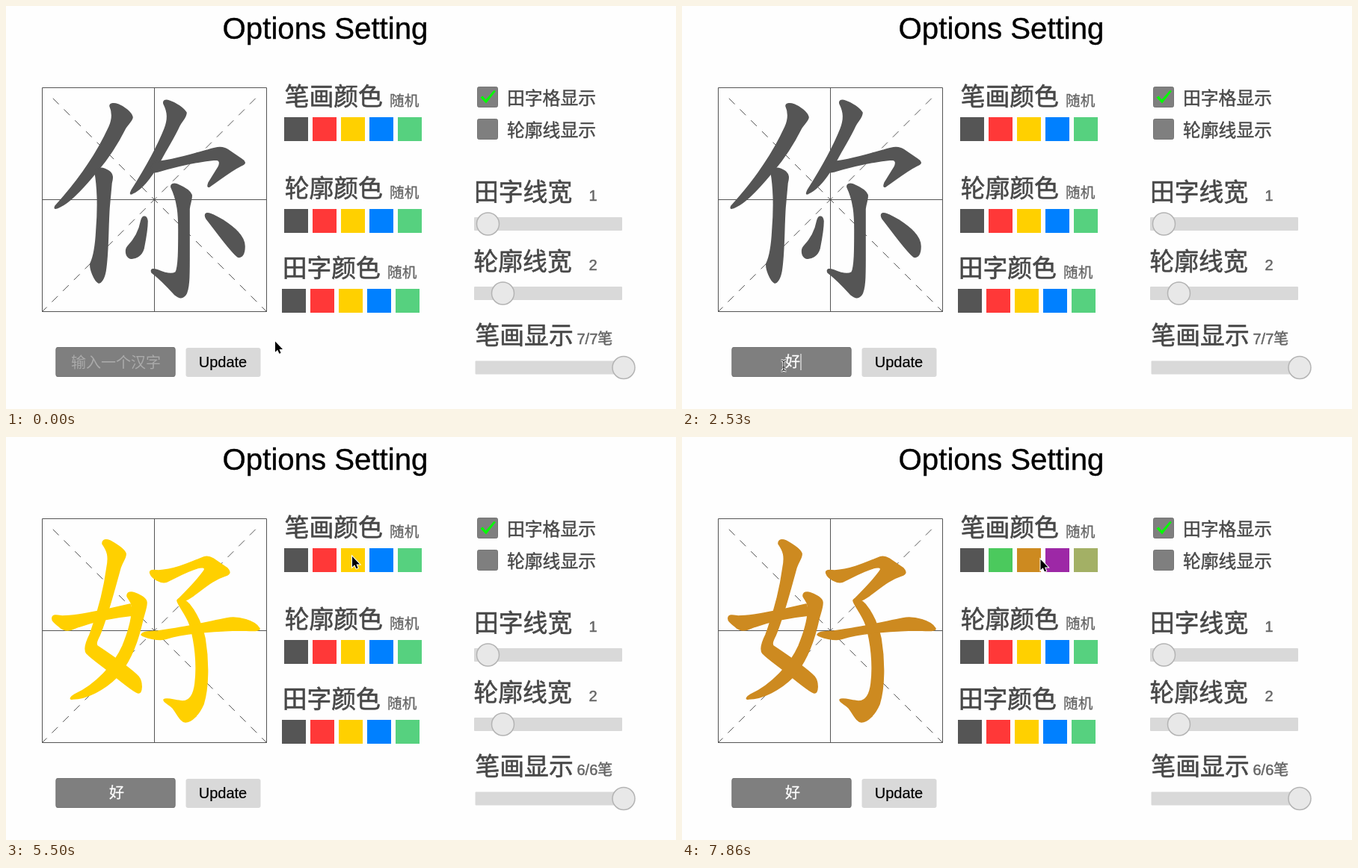
An HTML page for the animation above (8 s loop, 896 px wide and 540 px high).

```html
<!DOCTYPE html>
<html lang="zh">
<head>
<meta charset="utf-8">
<title>Options Setting</title>
<style>
html, body { margin: 0; width: 100%; height: 100%; overflow: hidden; background: #fefefe; }
svg { display: block; width: 896px; height: 540px; }
text { font-family: "Liberation Sans", "Noto Sans CJK SC", "Noto Sans CJK", sans-serif; white-space: pre; }
.cjk { font-family: "Noto Sans CJK SC", "Noto Sans CJK", sans-serif; }
</style>
</head>
<body>
<svg id="stage" viewBox="0 0 896 540">
  <defs>
    <filter id="shade" x="-10%" y="-60%" width="120%" height="240%">
      <feDropShadow dx="0" dy="3" stdDeviation="5" flood-opacity=".3"/>
    </filter>
  </defs>
</svg>
<script>
const stage = document.getElementById('stage');
const GREY = '#555555', RED = '#ff3838', YELLOW = '#ffd000', BLUE = '#0080ff', GREEN = '#56d17f';
const BASE = [GREY, RED, YELLOW, BLUE, GREEN];
const RANDOM = [GREY, '#4bc95d', '#cd8a20', '#9d28a6', '#a3b065'];
const LOOP = 8000;

function add(tag, attrs, parent = stage) {
  const el = document.createElementNS('http://www.w3.org/2000/svg', tag);
  for (const k in attrs) el.setAttribute(k, attrs[k]);
  parent.appendChild(el);
  return el;
}
const group = (parent, attrs = {}) => add('g', attrs, parent);
const rect = (x, y, width, height, fill, rx = 0, parent) =>
  add('rect', { x, y, width, height, fill, rx }, parent);
function text(str, x, y, size, fill, opts = {}, parent) {
  const el = add('text', { x, y, 'font-size': size, fill, ...opts }, parent);
  el.textContent = str;
  return el;
}
const MID = { 'text-anchor': 'middle' };
const heavier = (stroke, width) => ({ stroke, 'stroke-width': width });
const show = (el, on) => el.setAttribute('display', on ? 'inline' : 'none');

// Writing grid
const grid = group(stage, { fill: 'none', stroke: GREY, 'stroke-width': 1 });
add('path', { d: 'M48.5 109.5H348.5V409.5H48.5ZM198.5 109.5V409.5M48.5 259.5H348.5' }, grid);
for (const d of ['M62.8 123.8L348.5 409.5', 'M333.7 123.8L48.5 409.5'])
  add('path', { d, 'stroke-dasharray': '11 9.8' }, grid);

// Brush strokes of the two characters
const GLYPHS = {
  你: [
    'M139 134C139 130 145 130 150 132C158 135 168 143 169 149C169 153 164 157 160 163C150 183 136 205 122 221C104 243 84 264 72 269C66 272 64 272 66 268C85 247 97 232 110 212C122 194 132 175 138 162C143 151 143 143 139 134Z',
    'M119 222C124 215 131 217 137 221C143 225 143 230 141 237L138 270C136 300 137 330 133 355C131 366 127 371 124 371C118 368 112 352 113 345C118 335 120 320 121 300C123 275 123 245 119 222Z',
    'M211 131C210 127 213 125 218 127C228 130 238 138 241 143C241 149 236 153 232 160C224 178 214 192 205 210C196 226 183 245 169 251C166 253 166 251 168 247C180 228 200 195 212 165C217 152 217 143 211 131Z',
    'M198 209C225 207 250 198 270 193C283 189 290 188 297 193L316 206C321 209 320 212 314 214C298 222 283 235 272 242C269 243 270 240 271 237L284 216C287 210 286 206 280 206C258 208 230 214 203 222C195 224 190 222 198 209Z',
    'M221 243C220 238 226 237 231 240C238 243 246 248 248 253C249 258 246 263 245 272L245 340C245 360 245 380 240 387C235 393 231 391 226 387C218 378 207 366 195 357C193 352 197 352 203 354C212 358 222 360 227 357C231 350 231 325 231 300C231 280 230 262 221 243Z',
    'M181 287C183 280 188 281 189 288C189 300 186 315 184 325C181 335 173 339 166 338C160 335 159 327 163 322C171 314 178 303 181 287Z',
    'M268 278C271 276 280 281 290 287C305 297 319 308 319 322C319 333 315 338 310 336C301 330 280 300 268 285C266 281 266 279 268 278Z'
  ],
  好: [
    'M129 143C129 137 134 137 139 139C148 144 158 150 160 156C161 161 156 166 153 175C146 200 136 240 125 266C121 274 120 277 122 280C140 292 165 309 177 321C183 329 182 343 177 343C172 342 160 332 145 320C130 307 118 300 108 290C104 285 107 275 112 265C122 238 131 205 135 175C138 160 136 153 129 143Z',
    'M162 213C162 208 167 207 172 209C180 212 188 217 188 222C188 230 184 238 182 248C176 275 165 303 148 322C132 338 108 351 89 351C84 352 87 348 92 345C120 332 145 305 156 280C165 258 170 238 168 225C167 219 163 217 162 213Z',
    'M62 242C63 238 68 239 75 240C95 240 115 235 135 231L166 224L170 239C140 242 110 249 90 257C82 261 76 259 70 253C65 249 61 246 62 242Z',
    'M193 183C191 178 197 178 204 179C225 178 245 169 262 162C268 159 272 160 277 163L296 176C301 181 299 184 293 186C277 191 264 203 250 213C241 219 235 222 230 218C240 208 256 192 265 179C267 175 264 174 259 175C245 178 228 188 215 194C207 197 195 189 193 183Z',
    'M229 219C232 214 240 219 245 224C255 236 262 252 266 270C271 300 271 335 264 358C258 372 248 382 240 382C233 381 230 372 223 363C219 358 211 356 211 352C214 349 225 353 236 354C245 354 251 347 253 330C256 305 253 275 246 252C241 237 229 224 229 219Z',
    'M181 265C183 260 192 261 203 260C235 256 265 249 295 243C310 240 334 246 339 257C338 261 325 259 308 259C280 260 240 262 215 270C205 274 184 268 181 265Z'
  ]
};
const glyphs = {};
for (const ch in GLYPHS) {
  glyphs[ch] = group(stage, { 'stroke-width': 1.6, 'stroke-linejoin': 'round' });
  for (const d of GLYPHS[ch]) add('path', { d }, glyphs[ch]);
}

// Title, colour rows
text('Options Setting', 427, 44, 40.2, '#000', { ...MID, ...heavier('#000', .4) });
const DARK = '#484848', SOFT = '#666';
const label = (str, x, y, size = 32.8) =>
  text(str, x, y, size, DARK, { class: 'cjk', ...heavier(DARK, size / 55) });
const swatches = [['笔画颜色', 372, 149], ['轮廓颜色', 372, 272], ['田字颜色', 369, 379]].map(([name, x, y]) => {
  label(name, x + .7, y - 16.2);
  text('随机', x + 141, y - 14.9, 19.7, SOFT, { class: 'cjk', ...heavier(SOFT, .3) });
  return BASE.map((c, i) => rect(x + 38 * i, y, 32, 32, c));
});

// Check boxes and sliders
[['田字格显示', 108], ['轮廓线显示', 151]].forEach(([name, y]) => {
  add('rect', { x: 630.5, y: y + .5, width: 27, height: 27, rx: 2, fill: '#7f7f7f', stroke: '#757575' });
  label(name, 670, y + 23.6, 23.8);
});
add('path', { d: 'M634.5 122.5L637.5 120.5L641.5 125.5L652.5 113L655 114L642 130.5Z', fill: '#00ff00' });

function slider(name, x, y, value, vx, knob, trackX, trackY) {
  label(name, x, y);
  const val = text(value, vx, y, 20, SOFT, heavier(SOFT, .5));
  rect(trackX, trackY, 198, 18, '#d9d9d9', 1);
  add('circle', { cx: knob, cy: trackY + 9, r: 15, fill: '#e8e8e8', stroke: '#b4b4b4', 'stroke-width': 1.5 });
  return val;
}
slider('田字线宽', 626, 260.7, '1', 779.5, 644.5, 626, 283);
slider('轮廓线宽', 625.5, 353.7, '2', 779.5, 664.5, 626, 376);
const count = slider('笔画显示', 627.5, 452.7, '7/7笔', 763.5, 826, 627.5, 475.5);

// Input and button
rect(66.5, 457, 160, 40, '#7f7f7f', 3);
add('rect', { x: 67, y: 457.5, width: 159, height: 39, rx: 3, fill: 'none', stroke: '#757575' });
const hint = text('输入一个汉字', 147, 484.5, 20, '#aaa', { ...MID, class: 'cjk' });
const field = text('', 148, 484, 20, '#fff', { ...MID, ...heavier('#fff', .3) });
const underline = rect(143, 486.5, 10, 1, '#fff');
const caret = rect(149, 466, 1, 22, '#fff');
const button = rect(240.5, 458, 100, 39, '#d9d9d9', 3);
text('Update', 290, 484, 20, '#000', { ...MID, ...heavier('#000', .2) });

// Autofill list
const list = group(stage);
rect(68, 223, 192, 232, '#28292d', 4, list);
[...'啊我哈去好酷'].forEach((c, i) =>
  text(c, 80, 254.5 + 36 * i, 13, '#f4f4f4', { class: 'cjk', 'font-weight': 500 }, list));

// Candidate bars of the input method
function candidates(words) {
  const g = group(stage);
  const bar = rect(131, 494, 0, 32, '#1b2021', 8, g);
  bar.setAttribute('filter', 'url(#shade)');
  let x = 134;
  words.forEach((w, i) => {
    const first = i === 0;
    if (first) rect(x, 497, 18 + 17 * w.length, 26, '#0058d0', 5, g);
    text(i + 1, x + 4, 514, 11, first ? '#fff' : '#84898a', {}, g);
    text(w, x + 13, 516, 16.5, '#fff', { class: 'cjk' }, g);
    x += 23.5 + 17 * w.length;
  });
  bar.setAttribute('width', x - 132.5);
  return g;
}
const bars = {
  h: candidates([...'哈蛤虾铪蝦鉿妎奤丷']),
  ha: candidates(['哈', '哈哈', '蛤', '虾', '哈哈', '铪', '蝦', '鉿', '奤']),
  hao: candidates(['好', '好的', '号', '毫', '好好', '豪', '耗', '浩', '昊'])
};

// Pointers
const arrow = add('path', {
  d: 'M0 0V14.2L3.2 11.3L5.4 16.3L7.6 15.4L5.5 10.4H10Z',
  fill: '#000', stroke: '#fff', 'stroke-width': 2, 'paint-order': 'stroke'
});
const beam = group(stage, { fill: 'none' });
for (const [stroke, w] of [['#fff', 3], ['#222', 1.2]])
  add('path', { d: 'M-3.5 -7Q0 -7 0 -4.5Q0 -7 3.5 -7M0 -5V5M-3.5 7Q0 7 0 4.5Q0 7 3.5 7M-2 2H2', stroke, 'stroke-width': w }, beam);

// Each step: start time, pointer x, pointer y, changes that stay
const START = { ch: '你', ink: GREY, value: '', composing: false, focus: false, list: false, caret: 0, beam: false, pressed: false, random: false };
const STEPS = [
  [0, 360, 449.5],
  [600, 318, 467],
  [750, 222, 481],
  [900, 136, 482, { beam: true }],
  [1050, 136, 482, { focus: true, list: true, caret: 149 }],
  [1500, 136, 482, { caret: 0 }],
  [1800, 136, 482, { list: false, value: 'h', composing: true, caret: 153.5 }],
  [1950, 136, 482, { value: 'ha', caret: 159.5 }],
  [2090, 136, 482, { value: 'hao', caret: 165 }],
  [2530, 136, 482, { value: '好', composing: false, caret: 158.5 }],
  [2680, 150, 482],
  [2830, 196, 482],
  [2980, 262, 482, { beam: false }],
  [3120, 307, 482],
  [3270, 307, 482, { pressed: true, focus: false, caret: 0 }],
  [3420, 307, 482, { pressed: false, ch: '好' }],
  [4020, 420, 385],
  [4160, 518, 296],
  [4460, 531, 262],
  [4610, 512, 234],
  [4760, 480, 206],
  [4910, 436, 175],
  [5050, 425, 163],
  [5200, 425, 163, { ink: RED }],
  [5350, 461, 161],
  [5500, 463, 160, { ink: YELLOW }],
  [5650, 492, 160],
  [5800, 499, 159],
  [5940, 499, 159, { ink: BLUE }],
  [6090, 536, 160],
  [6240, 540, 158, { ink: GREEN }],
  [6380, 530, 134],
  [6680, 530, 134, { random: true }],
  [6820, 518, 144],
  [6970, 482, 160],
  [7120, 440, 167],
  [7270, 426, 168],
  [7560, 464, 166, { ink: RANDOM[1] }],
  [7860, 479.5, 164, { ink: RANDOM[2] }]
];

function draw(t) {
  const s = { ...START };
  for (const [at, x, y, change] of STEPS) {
    if (at > t) break;
    Object.assign(s, { x, y }, change);
  }
  for (const ch in glyphs) {
    show(glyphs[ch], ch === s.ch);
    glyphs[ch].setAttribute('fill', s.ink);
    glyphs[ch].setAttribute('stroke', s.ink);
  }
  count.textContent = s.ch === '你' ? '7/7笔' : '6/6笔';
  swatches[0].forEach((el, i) => el.setAttribute('fill', (s.random ? RANDOM : BASE)[i]));

  show(hint, !s.value);
  hint.setAttribute('fill', s.focus ? '#6c6c6c' : '#aaa');
  hint.setAttribute('font-weight', s.focus ? 300 : 400);
  hint.setAttribute('x', s.focus ? 148.5 : 147);
  field.textContent = s.value;
  show(underline, s.composing);
  const w = 11.1 * s.value.length;
  underline.setAttribute('x', 148 - w / 2);
  underline.setAttribute('width', w);
  show(caret, s.caret);
  caret.setAttribute('x', s.caret);
  show(list, s.list);
  for (const key in bars) show(bars[key], s.composing && key === s.value);

  button.setAttribute('fill', s.pressed ? '#525252' : '#d9d9d9');
  button.setAttribute('stroke', s.pressed ? '#a8a8a8' : 'none');
  show(arrow, !s.beam);
  show(beam, s.beam);
  (s.beam ? beam : arrow).setAttribute('transform', `translate(${s.x} ${s.y})`);
}

const t0 = performance.now();
function tick() {
  draw((performance.now() - t0) % LOOP);
  requestAnimationFrame(tick);
}
draw(0);
requestAnimationFrame(tick);
</script>
</body>
</html>
```
